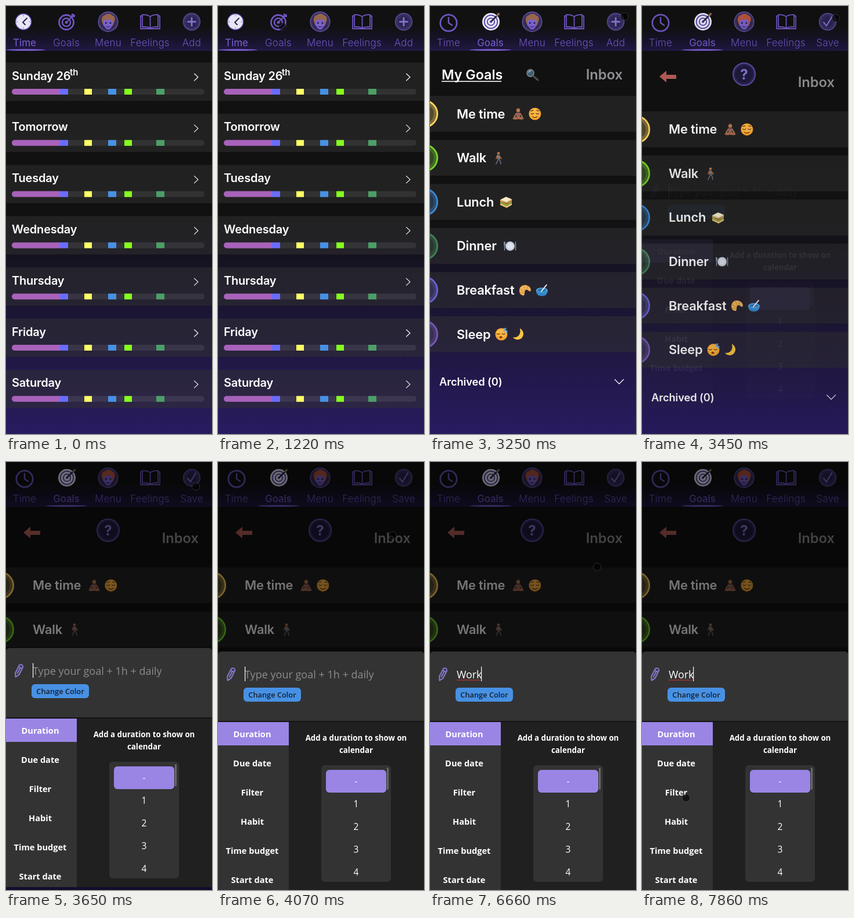
Write an HTML page that moves like this. It is 355 px wide and 734 px high and loops after 8 s.

```html
<!DOCTYPE html>
<html lang="en">
<head>
<meta charset="utf-8">
<title>Goal planner</title>
<style>
html, body { margin: 0; width: 100%; height: 100%; overflow: hidden; background: #111; }
svg { display: block; width: 100%; height: 100%; }
text { white-space: pre; }
.ui { font-family: Inter, sans-serif; }
.form { font-family: "Open Sans", "Noto Sans", sans-serif; }
</style>
</head>
<body>
<svg id="stage" viewBox="0 0 355 734" preserveAspectRatio="none">
  <defs>
    <linearGradient id="bg" gradientUnits="userSpaceOnUse" x1="0" y1="360" x2="0" y2="734">
      <stop offset="0" stop-color="#111"/><stop offset="1" stop-color="#291b60"/>
    </linearGradient>
    <linearGradient id="head" x1="0" y1="0" x2="0" y2="1">
      <stop offset=".45" stop-color="#111"/><stop offset=".75" stop-color="#17132a"/>
      <stop offset="1" stop-color="#211944"/>
    </linearGradient>
    <radialGradient id="badge">
      <stop offset=".5" stop-color="#2a2350"/><stop offset="1" stop-color="#40366f"/>
    </radialGradient>
  </defs>
</svg>
<script>
const LOOP = 8000;
const VIOLET = '#6f55c0', LILAC = '#9a85e4';
const stage = document.getElementById('stage');

// Markup helpers
const rect = (x, y, w, h, fill, more = '') => `<rect x="${x}" y="${y}" width="${w}" height="${h}" fill="${fill}" ${more}/>`;
const disc = (x, y, r, fill, more = '') => `<circle cx="${x}" cy="${y}" r="${r}" fill="${fill}" ${more}/>`;
const ring = (x, y, r, color, w) => disc(x, y, r, 'none', `stroke="${color}" stroke-width="${w}"`);
const oval = (x, y, rx, ry, fill) => `<ellipse cx="${x}" cy="${y}" rx="${rx}" ry="${ry}" fill="${fill}"/>`;
const shape = (d, fill) => `<path d="${d}" fill="${fill}"/>`;
const line = (d, color, w = 1) => `<path d="${d}" fill="none" stroke="${color}" stroke-width="${w}" stroke-linecap="round" stroke-linejoin="round"/>`;
const text = (s, x, y, size, weight, fill, more = '') => `<text x="${x}" y="${y}" font-size="${size}" font-weight="${weight}" fill="${fill}" ${more}>${s}</text>`;
const mid = 'text-anchor="middle"';
const at = (x, y, body) => `<g transform="translate(${x} ${y})">${body}</g>`;
const group = (id, body, more = '') => `<g id="${id}" ${more}>${body}</g>`;
const card = h => rect(0, 0, 355, h, '#333', 'fill-opacity=".5"');

// Small pictures, centred on 0,0
const face = disc(0, 0, 10.5, '#f9a52f') + oval(0, -2, 9, 7.5, '#fdb745');
const art = {
  yoga: disc(0, -9, 2, '#4a2f28') + disc(0, -6, 3.3, '#b9764f') +
    line('M-3 -1L-7 5M3 -1L7 5', '#b9764f', 2) + shape('M-3.500 -2H3.500L3 6H-3Z', '#94615f') +
    shape('M-10 8Q-6 3 0 6 6 3 10 8 8 11 0 9-8 11-10 8Z', '#a86a4c'),
  calm: face + line('M-7 -1Q-4.500 2-2 -1M2 -1Q4.500 2 7 -1M-7 -5L-3 -6M3 -6L7 -5M-4 4.500Q0 8 4 4.500', '#6b3d12', 1.3),
  walk: disc(0, -8, 2.4, '#b5714a') + shape('M-2.500 -5H2L3 2H-2Z', '#80757a') +
    line('M2 -3L5 1M-2 -4L-4 1', '#c07a4c', 1.5) + line('M1 2L3 5 4 10M0 2L-2 6-4 10', '#5c6474', 1.9),
  sandwich: shape('M-10 1L1 6 10 1V5L1 10-10 5Z', '#e8bd78') + shape('M-10 -1L1 4 10 -1V2L1 7-10 2Z', '#6fa53b') +
    shape('M-10 -2L1 3 10 -3V-1L1 5-10 0Z', '#d98a3c') + shape('M-10 -4L0 -9 10 -5 1 0Z', '#fbebc4') +
    shape('M-10 -4L1 0 10 -5V-3L1 2-10 -2Z', '#ebc27c'),
  plate: disc(0, 0, 8, '#c6cfde') + disc(0, 0, 5.4, '#dde4ee') +
    line('M-9.500 -7V7M9.500 -7V7', '#8d95a3', 1.4) + line('M-10.500 -7V-2H-8.500V-7', '#8d95a3', .8),
  croissant: shape('M-10 1C-10 -7-3 -11 4 -8 9 -6 11 -1 9 2 6 2 5 -1 2 -1-2 0 0 5-2 9-7 9-10 6-10 1Z', '#f0b35a') +
    line('M-3 -8L0 -1M4 -8L4 -1M-9 -2L-2 2M-9 4L-2 5', '#c98436', 1),
  bowl: shape('M-10 0H10C10 7 6 10 0 10S-10 7-10 0Z', '#2f86c8') + oval(0, 0, 10, 4.5, '#4da3dc') +
    oval(0, 0, 7.5, 2.8, '#2a6ea6') + line('M-1 2L8 -9', '#dfe6ec', 2),
  sleep: face + line('M-8 -1Q-5 1-3 -1M1 -1Q4 1 6 -1', '#6b3d12', 1.3) + oval(-1, 5, 2.6, 2, '#7b4217') +
    line('M4 -10H8L4 -6H8M8 -6H10L8 -3H10', '#5aa9e6', 1.3),
  moon: shape('M3 -10A10 10 0 1 1-9 5C-1 7 6 0 3 -10Z', '#fbc740'),
  lens: line('M3 3L10 9', '#4b4d50', 3) + disc(-3, -3, 6, '#3f5f72', 'stroke="#777c80" stroke-width="1.8"') +
    line('M-6 -4Q-5 -7-2 -7', '#9fc0d2', 1.3)
};

// Header
const dart = (color, w) => line('M104 28L114 18M114 18V14L118 16 114 18H118', color, w);
const goalIcon = ring(104, 28, 12.5, VIOLET, 2.8) + ring(104, 28, 7, VIOLET, 2.6) + disc(104, 28, 2.5, VIOLET) + dart(VIOLET, 2.2);
const goalIconOn = disc(105, 27, 15, '#eceaf6') + ring(105, 27, 11.3, '#5d4bab', 2) + ring(105, 27, 6.2, '#5d4bab', 2) +
  disc(105, 27, 2.2, '#5d4bab') + at(2, -2, dart('#2a2438', 2.6) + line('M113 19L117 15', '#d9ae62', 1.6));
const avatar = hair => disc(176, 27, 16.8, '#2d2650', 'stroke="#6a58ac" stroke-width="1.4"') +
  ring(176, 27, 14.4, '#41376f', 1.6) +
  shape('M166 29C163 23 166 16 170 16 174 12 180 13 183 16 188 17 189 24 186 29L184 34H168Z', hair) +
  shape('M168 27Q172 21 176 24 181 21 184 27L183 34Q180 40 176 40T169 34Z', '#7a62cc') +
  disc(172.300, 29, 1.5, '#211946') + disc(180, 29, 1.5, '#211946') + line('M173.500 35Q176 37 179 35', '#3a2668', 1.5);
const plusBadge = disc(320, 27, 14.5, 'url(#badge)', 'stroke="#584a94" stroke-width="1.4"');
const book = line('M248.500 18Q242 14 235 15V36Q243 35 248.500 38 254 35 262 36V15Q255 14 248.500 18V38M235 17H232V39H265V17H262', VIOLET, 1.8);
const label = (s, x, on) => text(s, x, 69, on ? 16.8 : 17, on ? 500 : 300, VIOLET, `${mid} letter-spacing="${on ? 0 : .2}"`);
const tab = (x, w) => oval(x + w / 2, 75.3, w / 2, 1.5, '#7a5fd0');

const header = rect(0, 0, 355, 77, 'url(#head)') +
  group('timeOn', disc(30, 27, 13.5, '#e8e6f5', `stroke="${VIOLET}" stroke-width="1.4"`) +
    line('M36 21L29 28 33 32', '#2a2350', 2) + line('M30 16V17M30 37V38M19 27H20M40 27H41', '#8c80b8', 1.3) +
    label('Time', 32, true) + tab(0, 68) + goalIcon + label('Goals', 104)) +
  group('goalsOn', ring(32, 29, 14.2, VIOLET, 2.8) + line('M32 20V29L38 33', VIOLET, 2.5) + label('Time', 32) +
    goalIconOn + label('Goals', 104, true) + tab(68, 72)) +
  group('calmFace', avatar('#96664c')) + group('redFace', avatar('#b8543e')) +
  label('Menu', 176) + book + label('Feelings', 248) + plusBadge +
  group('add', line('M320 20.500V33.500M313.500 27H326.500', '#8270c8', 3) + label('Add', 320)) +
  group('save', line('M313 28L318 34 327 19', '#8270c8', 2.2) + label('Save', 320));

// Day list
const segments = [[93, 14, '#6a6cff'], [135, 13, '#ffff66'], [176, 14, '#4791e4'], [204, 13, '#85ff1f'], [259, 14, '#4b9f67']];
const days = ['Sunday 26', 'Tomorrow', 'Tuesday', 'Wednesday', 'Thursday', 'Friday', 'Saturday'];
const dayCard = (name, i) => at(0, 97 + i * 87.8,
  card(65.6) + text(name, 10, 29.5, 20, 600, '#fff', 'letter-spacing="-.2"') +
  (i ? '' : text('th', 110, 22, 15, 600, '#fff')) +
  line('M324.500 19L331 25 324.500 31', '#fff', 1.1) +
  rect(10, 45, 332, 10, '#fff', 'fill-opacity=".08" rx="5"') +
  shape('M15 45H93V55H15A5 5 0 0 1 15 45Z', '#a862ba') +
  segments.map(([x, w, c]) => rect(x, 45, w, 10, c)).join(''));

// Goal list
const goals = [
  ['Me time', '#ffd45c', 152, 'yoga', 'calm'], ['Walk', '#78d42b', 118, 'walk'],
  ['Lunch', '#3c88d6', 131, 'sandwich'], ['Dinner', '#438056', 138, 'plate'],
  ['Breakfast', '#6a64d2', 164, 'croissant', 'bowl'], ['Sleep', '#7659b4', 123, 'sleep', 'moon']
];
const goalCard = ([name, color, x, ...pics], i) => at(0, 154 + i * 75.6,
  card(61.5) +
  disc(-10, 31, 22.5, color, `fill-opacity=".22" stroke="${color}" stroke-width="3"`) +
  disc(-10, 31, 18.5, 'none', `stroke="${color}" stroke-opacity=".25" stroke-width="4"`) +
  text(name, 46, 38.5, 21.8, 600, '#fff', 'letter-spacing="-.15"') +
  pics.map((p, k) => at(x + k * 28.8, 31, art[p])).join(''));

const goalsPage = group('goalTabs',
    text('My Goals', 20, 126, 23.3, 600, '#fff') + rect(20, 128.5, 103, 1.6, '#fff') + at(176, 118, art.lens)) +
  group('formTabs', shape('M30 121L42 111V118H59V125H42V131Z', '#b85f58') +
    disc(176, 117, 19, '#1f1b3d', 'stroke="#5f50a8" stroke-width="2"') + ring(176, 117, 16.5, '#2f2860', 2) +
    text('?', 176, 125.5, 24, 700, '#8b7ad6', mid)) +
  group('inbox', text('Inbox', 332, 126, 23.7, 600, '#929094', 'text-anchor="end"')) +
  group('goalList', goals.map(goalCard).join('') +
    text('Archived (0)', 16, 651, 18.3, 600, '#fff', 'letter-spacing="-.1"') +
    line('M318.500 640.500L326 648 333.500 640.500', '#fff', 1.2));

// Goal form, in its resting place
const options = ['Duration', 'Due date', 'Filter', 'Habit', 'Time budget', 'Start date'];
const form = rect(0, 325, 355, 410, '#141414', 'rx="6"') +
  shape('M0 444V331Q0 325 6 325H349Q355 325 355 331V444Z', '#333') +
  at(22, 364, `<g transform="rotate(27)">${line('M-3.500 -9Q0 -14 3.500 -9V6L0 12-3.500 6ZM-3.500 -6H3.500M0 -5V5', '#8577cc', 2.1)}</g>`) +
  group('hint', text('Type your goal + 1h + daily', 46, 370.5, 18, 400, '#8c8c8c')) +
  '<text id="typed" x="46" y="371" font-size="17.800" fill="#fff"></text>' +
  group('squiggle', line('M46 374' + 'q1 -1.800 2 0t2 0'.repeat(10), '#d23a35', 1)) +
  group('caret', rect(0, 351, 1.2, 25, '#fff')) +
  rect(44, 387, 99, 24, '#4791e4', 'rx="6"') + text('Change Color', 93.5, 403.7, 12.8, 600, '#16202c', mid) +
  rect(0, 446, 122, 289, '#333') + rect(122, 446, 233, 289, '#202020') + rect(0, 446, 122, 40, LILAC) +
  options.map((s, i) => text(s, 59, 472 + i * 50, 14.6, 700, '#fff', mid)).join('') +
  text('Add a duration to show on', 238, 477.5, 13.3, 700, '#fff', mid) +
  text('calendar', 238, 499, 13.3, 700, '#fff', mid) +
  rect(178, 520, 120, 200, '#333', 'rx="6"') + rect(186, 528, 104, 39, LILAC, 'rx="6"') +
  rect(291, 524, 3, 38, '#696969', 'rx="1.5"') +
  ['-', 1, 2, 3, 4].map((s, i) => text(s, 238, 553 + i * 39, 15.5, 400, '#fff', mid)).join('');

stage.innerHTML += rect(0, 0, 355, 734, 'url(#bg)') +
  `<g class="ui">${header}${group('dayPage', days.map(dayCard).join(''))}${group('goalPage', goalsPage)}</g>` +
  rect(0, 0, 355, 734, '#000', 'id="shade"') + group('form', form, 'class="form"') +
  disc(0, 0, 6.6, '#000', 'id="pointer" fill-opacity=".6" stroke="#777" stroke-opacity=".35" stroke-width="1"');

// Held steps: [start, ...values]
const pointerSteps = [
  [200, 337, 717], [404, 318, 620], [608, 262, 430], [812, 190, 230], [1016, 134, 85], [1220, 111, 35],
  [1614, 113, 32], [1818, 122, 38], [2022, 150, 58], [2226, 190, 82], [2430, 228, 92],
  [2630, 262, 84], [2840, 300, 58], [3040, 328, 30], [3250, 335, 18], [3450, 334, 21], [3650, 327, 42],
  [3850, 316, 76], [4050, 301, 126], [4250, 291, 164], [4450, 288, 180],
  [7050, 304, 169], [7250, 262, 330], [7450, 172, 560], [7660, 100, 694], [7860, 76, 576]
];
const typedSteps = [[0, '', 46], [5060, 'W', 63], [5260, 'Wo', 73], [5460, 'Work', 88], [5660, 'Work ', 93], [6660, 'Work', 88]];
const caretOff = [[4450, 5060], [6260, 6660], [7250, 7860]];
// [start, form lift, form opacity, shade]
const formSteps = [[0, 0, 0, 0], [3450, 46, .07, .06], [3650, 6, 1, .52], [3850, 0, 1, .54]];

const el = id => document.getElementById(id);
const held = (steps, t) => steps.findLast(s => s[0] <= t);
const show = (id, on) => el(id).setAttribute('display', on ? 'inline' : 'none');
const move = (id, x, y) => el(id).setAttribute('transform', `translate(${x} ${y})`);

function render(t) {
  const onGoals = t >= 1410, editing = t >= 3450;
  for (const id of ['timeOn', 'dayPage']) show(id, !onGoals);
  for (const id of ['goalsOn', 'goalPage']) show(id, onGoals);
  for (const id of ['calmFace', 'add', 'goalTabs']) show(id, !editing);
  for (const id of ['redFace', 'save', 'formTabs', 'form']) show(id, editing);
  move('inbox', 0, editing ? 13 : 0);
  move('goalList', 0, editing ? 26.7 : 0);

  const [, lift, alpha, dim] = held(formSteps, t);
  move('form', 0, -lift);
  el('form').setAttribute('opacity', alpha);
  el('shade').setAttribute('opacity', dim);

  const [, word, caretX] = held(typedSteps, t);
  el('typed').textContent = word;
  show('hint', !word);
  show('squiggle', t >= 6660);
  move('caret', caretX, 0);
  show('caret', !caretOff.some(([a, b]) => t >= a && t < b));

  const spot = held(pointerSteps, t);
  show('pointer', spot);
  if (spot) move('pointer', spot[1], spot[2]);
}

const start = performance.now();
function tick() {
  render((performance.now() - start) % LOOP);
  requestAnimationFrame(tick);
}
render(0);
requestAnimationFrame(tick);
</script>
</body>
</html>
```
